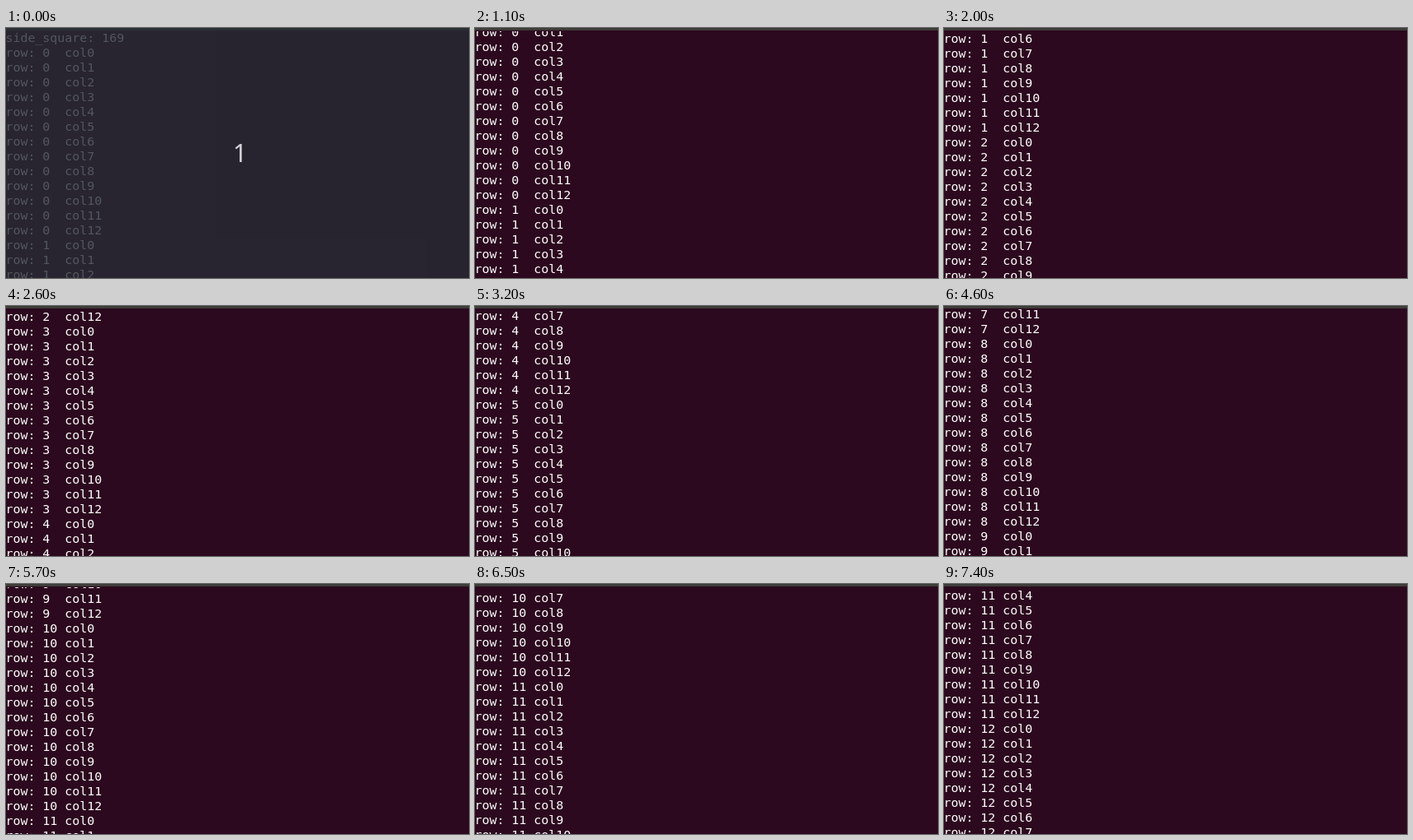
These frames come from a looping animation (561x304 px, 8000 ms). An HTML page:

```html
<!DOCTYPE html>
<html lang="en">
<head>
<meta charset="utf-8">
<title>Terminal scroll</title>
<style>
  html, body { margin: 0; width: 100%; height: 100%; overflow: hidden; }
  body { position: relative; background: #2c091e; }
  .bar { position: absolute; inset: 0 0 auto; height: 3px; background: #3d3c38; }
  .view { position: absolute; inset: 4px 0 0; overflow: hidden; }
  pre {
    position: absolute; left: -.6px; top: -1px; margin: 0;
    font: 14.95px/18px "DejaVu Sans Mono", monospace;
    color: #fff;
  }
  .count {
    position: absolute; inset: 0;
    background: rgba(39, 44, 53, .8);
  }
  .count span {
    position: absolute; left: 3px; width: 100%; top: 131px;
    text-align: center;
    font: 30px/41px "Noto Sans", sans-serif;
    color: #d8d2da;
  }
</style>
</head>
<body>
<div class="bar"></div>
<div class="view"><pre id="log"></pre></div>
<div class="count" id="count"><span>1</span></div>
<script>
const LOOP = 8000, TICK = 100, SIDE = 13;

// [time in ms, scroll in px]: three swipes with short rests
const path = [
  [600, 0], [1100, 43], [2000, 359], [3200, 1080], [4000, 1500],
  [4100, 1500], [4600, 1856], [5700, 2316], [5900, 2350],
  [6100, 2350], [7000, 2661], [7400, 2662]
];

const slope = i =>
  path[i] && path[i + 1]
    ? (path[i + 1][1] - path[i][1]) / (path[i + 1][0] - path[i][0])
    : 0;

// harmonic mean of the neighbouring slopes, zero at rests and ends
function speed(i) {
  const a = slope(i - 1), b = slope(i);
  return a * b > 0 ? 2 * a * b / (a + b) : 0;
}

// monotone cubic curve through the path
function scrollAt(t) {
  if (t <= path[0][0]) return 0;
  const i = path.findIndex(p => p[0] >= t);
  if (i < 0) return path.at(-1)[1];
  const [t0, y0] = path[i - 1], [t1, y1] = path[i];
  const d = t1 - t0, u = (t - t0) / d, w = 1 - u;
  const y = y0 + (y1 - y0) * u * u * (3 - 2 * u) +
    d * u * w * (speed(i - 1) * w - speed(i) * u);
  return Math.floor(y);
}

const log = document.getElementById('log');
const count = document.getElementById('count');

const lines = [`side_square: ${SIDE * SIDE}`];
for (let row = 0; row < SIDE; row++)
  for (let col = 0; col < SIDE; col++)
    lines.push(`row: ${String(row).padEnd(2)} col${col}`);
log.textContent = lines.join('\n');

const steps = [];
for (let t = 0; t <= LOOP; t += TICK)
  steps.push({
    offset: t / LOOP,
    transform: `translateY(${-scrollAt(t)}px)`,
    easing: 'step-end'
  });

const timing = { duration: LOOP, iterations: Infinity };
log.animate(steps, timing);
count.animate([
  { offset: 0, opacity: 1, easing: 'step-end' },
  { offset: 500 / LOOP, opacity: 0, easing: 'step-end' },
  { offset: 1, opacity: 0 }
], timing);
</script>
</body>
</html>
```
